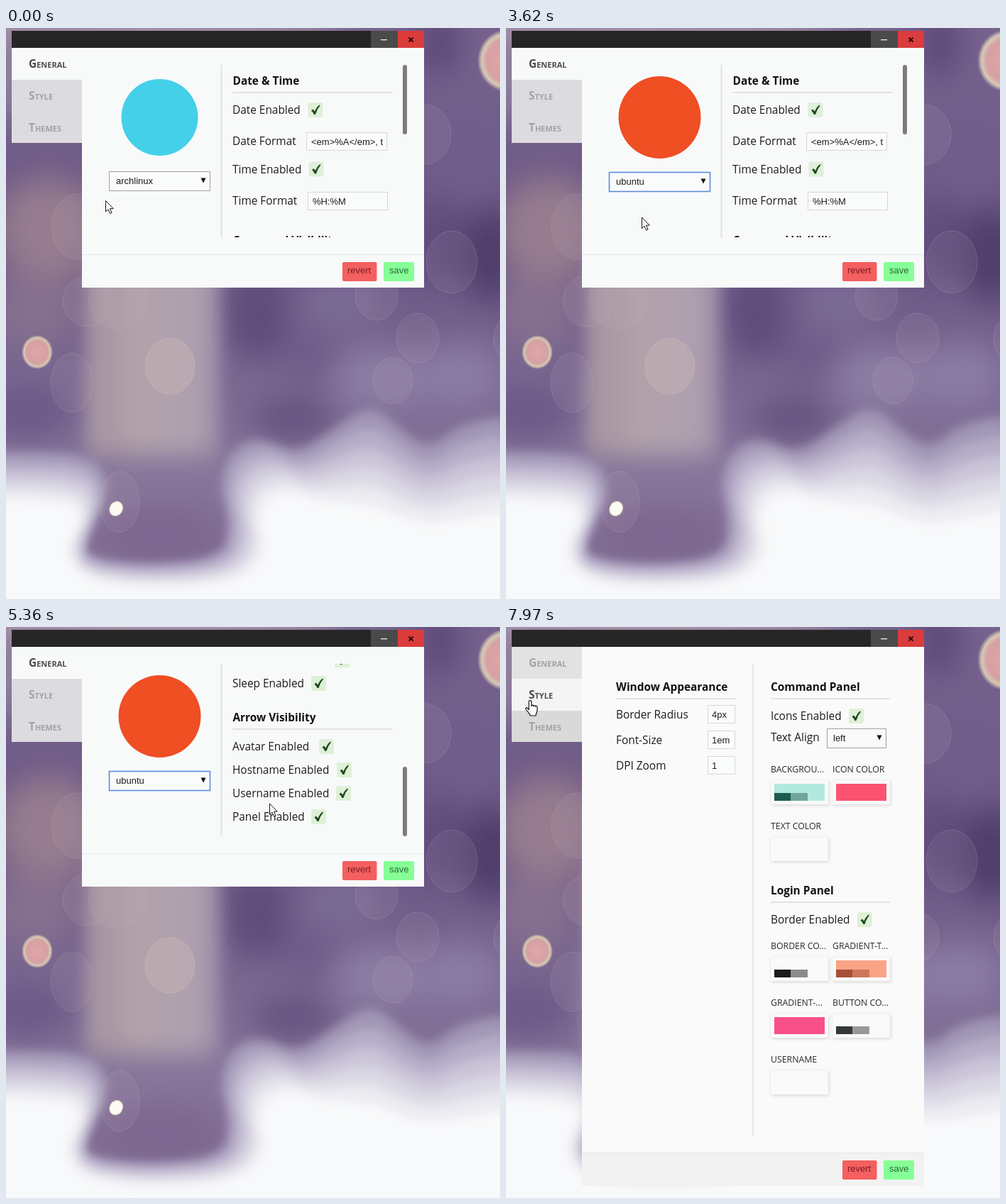
Animation of 696 by 805 pixels, one loop 8000 ms. Source, as an HTML page:

```html
<!DOCTYPE html>
<html lang="en">
<head>
<meta charset="utf-8">
<title>Settings window</title>
<style>
  html, body { margin: 0; width: 100%; height: 100%; overflow: hidden; background: #7a668e; }
  svg { display: block; width: 696px; height: 805px; }
  text { white-space: pre; }
  .label { font: 400 15.4px "Open Sans", sans-serif; fill: #1c1c1c; }
  .head { font: 700 15.4px "Open Sans", sans-serif; fill: #111; }
  .tab { font: 700 15.4px "Open Sans", sans-serif; font-variant: small-caps; fill: #a3a2a6; }
  .cap { font: 400 12.3px "Open Sans", sans-serif; fill: #2a2a2a; }
  .ui { font: 13px "Liberation Sans", Arial, sans-serif; fill: #1c1c1c; }
  .box { fill: #fafbfb; stroke: #d6d6d6; }
  .rule { fill: #e2e2e5; }
</style>
</head>
<body>
<svg id="stage" viewBox="0 0 696 805">
  <defs>
    <linearGradient id="sky" x2="0" y2="1">
      <stop offset="0" stop-color="#77638e"/><stop offset=".4" stop-color="#6b5684"/>
      <stop offset=".65" stop-color="#7c6a93"/><stop offset=".8" stop-color="#87759b"/>
      <stop offset="1" stop-color="#80698f"/>
    </linearGradient>
    <linearGradient id="beam">
      <stop offset="0" stop-color="#a391a0"/><stop offset=".4" stop-color="#b2a2aa"/>
      <stop offset=".8" stop-color="#afa0b0"/><stop offset="1" stop-color="#9c8ca6"/>
    </linearGradient>
    <radialGradient id="pink">
      <stop offset="0" stop-color="#e3a5a8"/><stop offset=".68" stop-color="#d5a1a4"/>
      <stop offset=".85" stop-color="#d6c9b4"/><stop offset="1" stop-color="#d6c9b4" stop-opacity="0"/>
    </radialGradient>
    <filter id="soft" x="-60%" y="-60%" width="220%" height="220%"><feGaussianBlur stdDeviation="22"/></filter>
    <filter id="beamBlur" x="-20%" y="-20%" width="140%" height="140%"><feGaussianBlur stdDeviation="11 18"/></filter>
    <filter id="mist" x="-20%" y="-20%" width="140%" height="140%"><feGaussianBlur stdDeviation="7"/></filter>
    <filter id="shade" x="-10%" y="-10%" width="120%" height="120%"><feGaussianBlur stdDeviation="2"/></filter>
    <clipPath id="view"><rect x="316" y="52" width="252" height="243"/></clipPath>
  </defs>
  <g id="photo"></g>
  <g id="window"></g>
  <g id="cursor" stroke="#111" stroke-linejoin="round">
    <path id="arrow" fill="#fff" d="M.5 .5V16L4 12.6 6.5 18.6 9 17.5 6.5 11.6H11.2Z"/>
    <path id="hand" fill="#fff" stroke-width="1.2" d="M-1.8 13V2a1.8 1.8 0 0 1 3.6 0V8c0-1.8 3-1.8 3 .3c0-1.6 2.8-1.6 2.8 .5c0-1.4 2.4-1.4 2.4 .6V14c0 3-2 4-2 7.5H0c0-3-3.5-5-6-9c-1.2-2 .8-3 2.2-1.6Z"/>
  </g>
</svg>
<script>
const LOOP = 8000, MAX_SCROLL = 360, TALL = 422;
const $ = id => document.getElementById(id);

// Markup helpers
const rect = (x, y, w, h, fill, extra = '') =>
  `<rect x="${x}" y="${y}" width="${w}" height="${h}" fill="${fill}" ${extra}/>`;
const text = (cls, x, y, s, extra = '') =>
  `<text class="${cls}" x="${x}" y="${y}" ${extra}>${s.replace(/&/g, '&amp;').replace(/</g, '&lt;')}</text>`;
const blob = (x, y, rx, ry, fill, extra = '') =>
  `<ellipse cx="${x}" cy="${y}" rx="${rx}" ry="${ry}" fill="${fill}" ${extra}/>`;
const heading = (x, y, s, w) =>
  text('head', x, y, s) + `<rect class="rule" x="${x}" y="${y + 10}" width="${w}" height="2"/>`;
const check = (x, y) => rect(x, y, 21, 21, '#dff0d8', 'rx="3"') +
  `<path transform="translate(${x} ${y})" fill="#1f4a20" d="M4.5 11.5L7 9.5 9.3 12.6Q11.5 7 15.8 3.6L17 4.6Q12.6 9.8 10.4 17H8.4Q7 13.6 4.5 11.5Z"/>`;
const toggle = (x, y, s, boxX) => text('label', x, y, s) + check(boxX, y - 16);
const field = (x, y, w, h, s, textX) =>
  `<rect class="box" x="${x}" y="${y}" width="${w}" height="${h}"/>` + text('ui', textX, y + 17, s);
const triangle = (x, y) => `<path d="M${x} ${y}h7l-3.5 7z" fill="#111"/>`;

// Snow edge: each point runs from the outer rim (x, y) to the white core (x, y)
const rim = [
  [-60, 598, -60, 664], [50, 596, 50, 664], [125, 604, 105, 674], [148, 645, 103, 700],
  [122, 705, 82, 738], [103, 745, 108, 778], [200, 758, 200, 790], [308, 746, 325, 782],
  [314, 690, 368, 742], [300, 640, 354, 690], [316, 594, 368, 662], [358, 576, 402, 652],
  [410, 602, 432, 664], [465, 562, 470, 668], [515, 530, 520, 672], [560, 570, 560, 690],
  [598, 594, 600, 698], [642, 556, 650, 690], [760, 540, 760, 672]
];
function snow(k, fill) {
  const pts = rim.map(([x, y, u, v]) => [x + (u - x) * k, y + (v - y) * k]);
  let d = `M-60 870L${pts[0]}`;
  for (let i = 1; i < pts.length - 1; i++) {
    const [x, y] = pts[i], [u, v] = pts[i + 1];
    d += `Q${x} ${y} ${(x + u) / 2} ${(y + v) / 2}`;
  }
  return `<path fill="${fill}" filter="url(#mist)" d="${d}L760 870Z"/>`;
}

function photo() {
  const soft = [
    [60, 285, 75, 75, '#957c8e'], [40, 400, 65, 55, '#86708f'], [30, 540, 65, 40, '#6d5987'],
    [200, -14, 280, 22, '#c0acb6'], [0, 60, 16, 80, '#a797ab'],
    [355, 405, 42, 62, '#5f4b7a'], [470, 390, 55, 45, '#7a6a95'], [430, 460, 45, 40, '#6f5c89'],
    [405, 550, 60, 30, '#65517f'], [530, 495, 70, 45, '#8c7da4'], [640, 490, 60, 45, '#8b7ca4'],
    [610, 20, 30, 50, '#5c4779'], [650, 170, 50, 60, '#715d8c'], [685, 320, 45, 65, '#4f3c6b'],
    [610, 300, 35, 60, '#604b7d'], [220, 715, 90, 40, '#7d6690']
  ];
  const rings = [
    [115, 385, 35, 36], [157, 384, 41, 40], [590, 150, 37, 42], [628, 330, 36, 44],
    [580, 437, 30, 35], [545, 497, 28, 33], [93, 500, 30, 42], [160, 668, 28, 43],
    [522, 378, 30, 34], [715, 438, 28, 34], [100, 280, 36, 46]
  ];
  const layers = ['#a196b5', '#b6adc8', '#cac4d8', '#dbd8e4', '#ebebf1', '#f8f9fa'];
  return rect(0, 0, 696, 805, 'url(#sky)') +
    `<g filter="url(#soft)">${soft.map(b => blob(...b)).join('')}</g>` +
    rect(112, 330, 190, 275, 'url(#beam)', 'filter="url(#beamBlur)"') +
    layers.map((c, i) => snow(i / (layers.length - 1), c)).join('') +
    rings.map(r => blob(...r, '#c3abbd', 'fill-opacity=".1" stroke="#c9b0bd" stroke-opacity=".22"')).join('') +
    blob(231, 477, 35, 39, '#bfadb1', 'fill-opacity=".7" stroke="#cbb9b8" stroke-opacity=".6"') +
    blob(44, 457, 22, 24, 'url(#pink)') + blob(705, 46, 41, 44, 'url(#pink)') +
    blob(155.5, 677.5, 9, 10.5, '#fbfbf3', 'transform="rotate(30 155 677)" stroke="#d8cfb8"');
}

function scrollContent() {
  const rows = (y, list) => list.map(([s, x], i) => toggle(319, y + 33 * i, s, x)).join('');
  return heading(319.5, 80, 'Date & Time', 225) +
    toggle(319, 121, 'Date Enabled', 425.5) +
    text('label', 319, 165, 'Date Format') + field(423.5, 147.5, 113, 25, '<em>%A</em>, t', 430) +
    toggle(319, 204.5, 'Time Enabled', 426.5) +
    text('label', 319, 248.5, 'Time Format') + field(425.5, 231.5, 112, 25, '%H:%M', 432) +
    heading(319.5, 304.5, 'Command Visibility', 225) +
    rows(346, [['Shutdown Enabled', 464], ['Reboot Enabled', 443], ['Hibernate Enabled', 463], ['Sleep Enabled', 430]]) +
    heading(319.5, 493, 'Arrow Visibility', 225) +
    rows(534, [['Avatar Enabled', 441], ['Hostname Enabled', 466], ['Username Enabled', 465], ['Panel Enabled', 430]]);
}

function general() {
  return rect(302.5, 52, 2, 243, '#e0e0e5') +
    '<circle id="logo" cx="216.5" cy="126"/>' +
    `<g id="select"><rect id="selectBox" x="145.5" y="202.5" width="142" height="27" fill="#fafbfb"/>
      ${text('ui', 155, 220, '', 'id="choice"')}${triangle(274.5, 211.5)}</g>` +
    `<g id="list">${rect(145.5, 229.5, 142, 50, '#fafbfb', 'stroke="#7d95cf"')}
      <rect id="pick" x="146" width="141" height="16.3" fill="#3390ff"/>
      ${['archlinux', 'antergos', 'ubuntu'].map((s, i) => text('ui item', 155, 243 + 16 * i, s)).join('')}</g>` +
    `<g clip-path="url(#view)"><g id="scroll">${scrollContent()}</g></g>` +
    '<rect id="thumb" x="559" width="6" height="98" rx="3" fill="#7c7c7c"/>';
}

// A colour card: main tone, then two optional smaller tones along its foot
function card(x, y, name, main, ...tones) {
  return text('cap', x, y - 11, name) +
    rect(x + 1, y + 1.5, 81, 34, '#bbb', 'filter="url(#shade)" opacity=".6"') +
    rect(x, y, 81, 34, '#fafafa', 'stroke="#eee" stroke-width=".6"') +
    (main ? rect(x + 5, y + 5, 71, 24, main) : '') +
    tones.map((c, i) => rect(x + 5 + 23.5 * i, y + 18, 23.5, 11, c)).join('');
}

function stylePage() {
  const sizes = [['Border Radius', '4px'], ['Font-Size', '1em'], ['DPI Zoom', '1']];
  return rect(107, 28, 482, 713, '#fafafa') + rect(347, 52, 2, 665, '#e6e6e8') +
    heading(155, 90, 'Window Appearance', 168) +
    sizes.map(([s, v], i) => text('label', 155, 129 + 36 * i, s) +
      field(284.5, 110.5 + 36 * i, 38, 25, v, 290)).join('') +
    heading(373, 90, 'Command Panel', 168) +
    toggle(373, 131, 'Icons Enabled', 483) + text('label', 373, 161, 'Text Align') +
    rect(452.5, 143.5, 83, 27, '#fafafa', 'stroke="#a0a0a0"') + text('ui', 461, 161, 'left') + triangle(522.5, 152.5) +
    card(373, 216, 'BACKGROU...', '#b2e9df', '#1f5a50', '#6fa59d') +
    card(460, 216, 'ICON COLOR', '#fb5370') + card(373, 296, 'TEXT COLOR') +
    heading(373, 377, 'Login Panel', 168) + toggle(373, 418, 'Border Enabled', 495) +
    card(373, 465, 'BORDER CO...', '', '#1b1a1f', '#8b8b8b') +
    card(460, 465, 'GRADIENT-T...', '#fba385', '#a94f35', '#cf775a') +
    card(373, 545, 'GRADIENT-...', '#fa5089') +
    card(460, 545, 'BUTTON CO...', '', '#353838', '#979998') +
    card(373, 625, 'USERNAME');
}

function windowMarkup() {
  const tabs = ['General', 'Style', 'Themes'].map((s, i) =>
    `<rect class="tabBox" x="8" y="${28 + 45 * i}" width="99" height="${i == 2 ? 44 : 45}"/>` +
    text('tab', 32, 56 + 45 * i, s)).join('');
  return rect(107, 28, 482, 338, '#f8fafa', 'id="body"') +
    rect(8, 4, 581, 24, '#262626') + rect(514, 4, 38, 24, '#4a4a4a') + rect(552, 4, 37, 24, '#db3c3c') +
    rect(528, 16, 9, 1.3, '#eee') +
    '<path d="M567.5 13.5l6 6m0-6l-6 6" stroke="#2b0b0b" stroke-width="1.8"/>' + tabs +
    `<g id="general">${general()}</g><g id="style">${stylePage()}</g>` +
    `<g id="footer">${rect(107, 319, 482, 47, '#f8fafa', 'id="footerBox"')}${rect(107, 319, 482, 1, '#e4e5e8')}
      ${rect(474, 330, 48.5, 27, '#f45f60', 'rx="2"')}${text('ui', 481, 346, 'revert', 'style="fill:#7b1d20"')}
      ${rect(532, 330, 43, 27, '#86ff97', 'rx="2"')}${text('ui', 540, 346, 'save', 'style="fill:#2a6a35"')}</g>`;
}

// Motion helpers
const progress = (t, a, b) => Math.min(1, Math.max(0, (t - a) / (b - a)));
const smooth = p => p * p * (3 - 2 * p);
const within = (t, ...spans) => spans.some(([a, b]) => t >= a && t < b);

// Each move: start, end, target x, target y, easing
const moves = [
  [890, 1150, 195, 228.5, smooth],
  [1950, 2350, 192, 265, smooth],
  [2720, 2721, 191, 266.5, smooth],
  [3620, 4140, 371, 248.5, smooth],
  [5570, 5690, 370, 246.5, smooth],
  [6820, 7100, 132, 197, p => p ** 1.25],
  [7100, 7560, 34, 103.5, p => 1 - (1 - p) ** 2.2]
];
function pointer(t) {
  let x = 140, y = 243;
  for (const [a, b, tx, ty, ease] of moves) {
    const p = ease(progress(t, a, b));
    x += (tx - x) * p;
    y += (ty - y) * p;
  }
  return [x, y];
}
const scrollAt = t => MAX_SCROLL *
  ((1 - progress(t, 5970, 6430)) ** 1.3 - (1 - progress(t, 4700, 5360)) ** 1.9);

const set = (el, attrs) => { for (const k in attrs) el.setAttribute(k, attrs[k]); };
const show = (id, on) => set($(id), { visibility: on ? 'visible' : 'hidden' });

$('photo').innerHTML = photo();
$('window').innerHTML = windowMarkup();
const items = document.querySelectorAll('.item');
const tabBoxes = document.querySelectorAll('.tabBox');
const tabNames = document.querySelectorAll('.tab');

function draw(t) {
  const [x, y] = pointer(t);
  const hand = within(t, [960, 2720], [4060, 5300], [6640, 6860], [7240, LOOP]);
  set($('cursor'), { transform: `translate(${x.toFixed(1)} ${y.toFixed(1)})` });
  show('hand', hand);
  show('arrow', !hand);

  const chosen = t >= 2720, focused = t >= 1400, ubuntu = t >= 2780;
  set($('logo'), { r: ubuntu ? 58 : 54, fill: ubuntu ? '#f04e23' : '#44d0e8' });
  set($('select'), { transform: `translate(0 ${chosen ? 1 : 0})` });
  set($('selectBox'), { stroke: focused ? '#5b8bdc' : '#a0a0a0', 'stroke-width': focused ? 1.6 : 1 });
  $('choice').textContent = chosen ? 'ubuntu' : 'archlinux';

  $('list').style.display = within(t, [1550, 2720]) ? '' : 'none';
  const row = Math.min(2, Math.max(0, Math.floor((y - 230) / 16)));
  set($('pick'), { y: 230 + 16 * row });
  items.forEach((el, i) => el.style.fill = i == row ? '#fff' : '#111');

  const scroll = Math.round(scrollAt(t));
  set($('scroll'), { transform: `translate(0 ${-scroll})` });
  set($('thumb'), { y: 52 + scroll * 145 / MAX_SCROLL });

  const clicked = t >= 7750, page = t >= 7810, grow = page ? TALL : 0;
  const fills = clicked ? ['#e2e2e2', '#f4f4f4', '#d9d9d9'] : ['#f8fafa', '#dcdbdf', '#dcdbdf'];
  const active = clicked ? 1 : 0;
  tabBoxes.forEach((el, i) => set(el, { fill: fills[i] }));
  tabNames.forEach((el, i) => el.style.fill =
    i == active || (i == 1 && t >= 7300) ? '#4c4c4e' : '#a3a2a6');
  set($('body'), { height: 338 + grow });
  set($('footer'), { transform: `translate(0 ${grow})` });
  set($('footerBox'), { fill: page ? '#f2f2f2' : '#f8fafa' });
  $('general').style.display = page ? 'none' : '';
  $('style').style.display = page ? '' : 'none';
  $('style').style.opacity = progress(t, 7780, 7950);
}

function frame() {
  draw(performance.now() % LOOP);
  requestAnimationFrame(frame);
}
frame();
</script>
</body>
</html>
```
